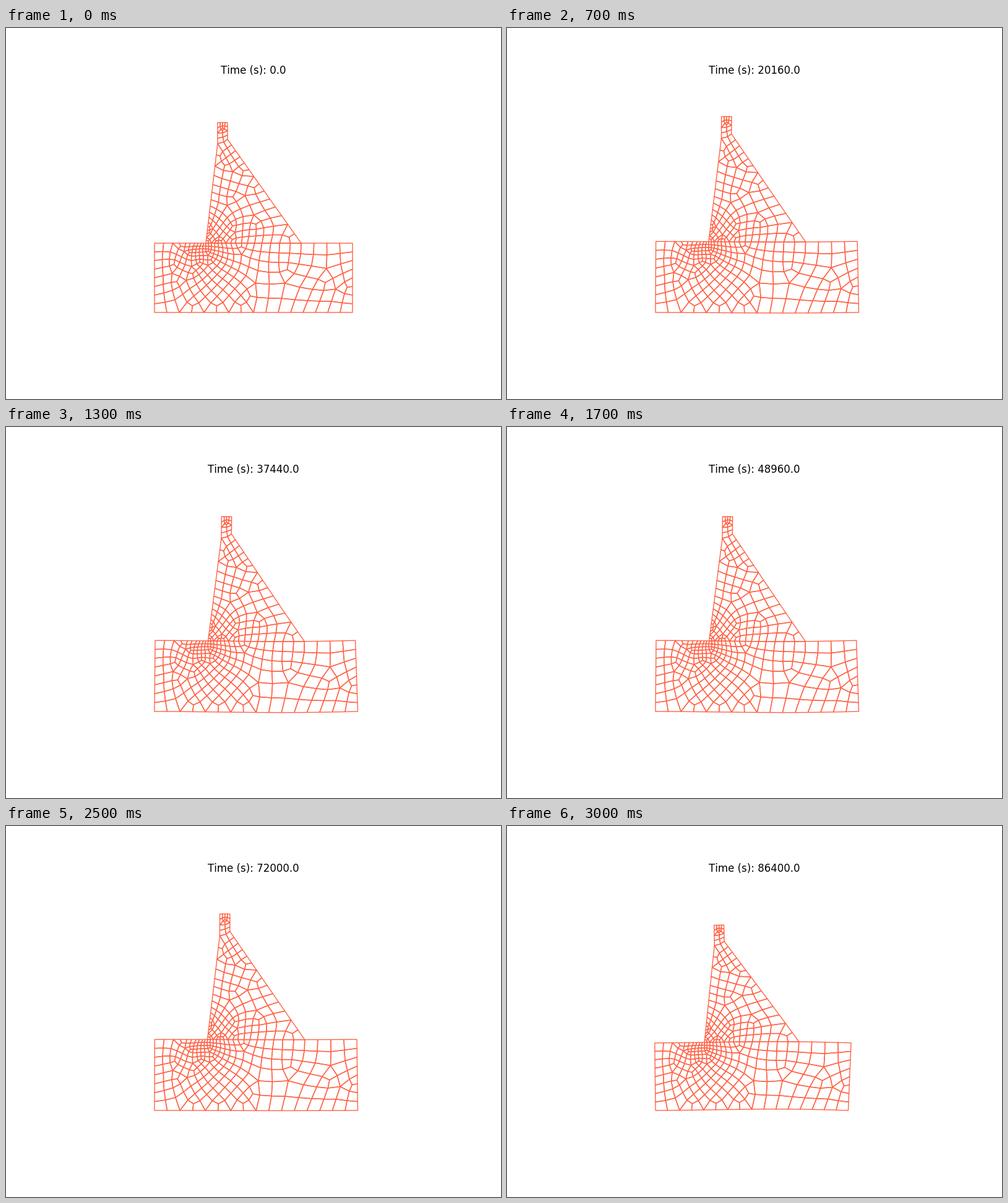
Animation, 800 px wide and 600 px high, one loop 3100 ms. Source, as a matplotlib script:

```python
import numpy as np
import matplotlib.pyplot as plt
from matplotlib.animation import FuncAnimation
from matplotlib.collections import PolyCollection
from matplotlib.path import Path
from matplotlib.tri import Triangulation

W, H, DPI = 800, 600, 100
FRAMES, INTERVAL, STEP = 31, 100, 2880.0
GROWTH = 0.26  # how fast cells grow away from fine borders

plt.rcParams["text.kerning_factor"] = 6


def side(a, b, n, ratio=1.0):
    """n + 1 points from a to b; the last gap is ratio times the first."""
    gaps = np.geomspace(1, ratio, n)
    t = np.r_[0, np.cumsum(gaps)] / gaps.sum()
    return np.outer(1 - t, a) + np.outer(t, b)


def dist(p, q):
    return np.hypot(p[:, None, 0] - q[None, :, 0], p[:, None, 1] - q[None, :, 1])


class Border:
    """Closed outline that sets the cell size inside it."""

    def __init__(self, *sides):
        self.nodes = np.concatenate([s[:-1] for s in sides])
        after = np.roll(self.nodes, -1, axis=0)
        gap = np.hypot(*(after - self.nodes).T)
        self.marks = np.r_[self.nodes, (self.nodes + after) / 2]
        self.spacing = np.r_[(gap + np.roll(gap, 1)) / 2, gap]
        self.path = Path(np.r_[self.nodes, self.nodes[:1]])

    def size(self, p):
        return (self.spacing + GROWTH * dist(p, self.marks)).min(axis=1)

    def allows(self, p):
        clear = (dist(p, self.marks) / self.spacing).min(axis=1) > 0.45
        return clear & self.path.contains_points(p)


def scatter(border, rng):
    """Random points kept apart by the local size, then pushed into even spacing."""
    low, high = border.nodes.min(axis=0), border.nodes.max(axis=0)
    trial = rng.uniform(low, high, (6000, 2))
    trial = trial[border.allows(trial)]
    pts = border.nodes
    for p, size in zip(trial, border.size(trial)):
        if np.hypot(*(pts - p).T).min() > 0.8 * size:
            pts = np.vstack([pts, p])

    inner = np.arange(len(border.nodes), len(pts))
    for _ in range(60):
        a, b = Triangulation(*pts.T).edges.T
        vec = pts[a] - pts[b]
        length = np.hypot(*vec.T)
        want = 1.1 * border.size((pts[a] + pts[b]) / 2)
        push = (0.2 * np.maximum(want / length - 1, 0))[:, None] * vec
        shift = np.zeros_like(pts)
        np.add.at(shift, a, push)
        np.add.at(shift, b, -push)
        moved = pts + shift
        ok = inner[border.allows(moved[inner])]
        pts[ok] = moved[ok]
    return pts


def skew(corners):
    """0 for a rectangle, 1 or more for a flat or folded quad."""
    ahead = np.roll(corners, -1, axis=0) - corners
    back = np.roll(corners, 1, axis=0) - corners
    cross = ahead[:, 0] * back[:, 1] - ahead[:, 1] * back[:, 0]
    if cross.min() * cross.max() <= 0:
        return 1.0
    lengths = np.hypot(*ahead.T) * np.hypot(*back.T)
    return np.abs((ahead * back).sum(axis=1) / lengths).max()


def pair_up(pts, tris):
    """Merge neighbouring triangles into quads, best shapes first."""
    owners = {}
    for t, tri in enumerate(tris):
        for k in range(3):
            owners.setdefault(frozenset((tri[k], tri[k - 1])), []).append(t)
    options = []
    for edge, pair in owners.items():
        if len(pair) == 2:
            a, b = edge
            c, d = (next(v for v in tris[t] if v not in edge) for t in pair)
            options.append((skew(pts[[a, c, b, d]]), pair, (a, c, b, d)))
    options.sort(key=lambda option: option[0])

    faces, used = [], set()
    for score, pair, quad in options:
        if score < 0.8 and used.isdisjoint(pair):
            faces.append(quad)
            used.update(pair)
    return faces + [tuple(t) for i, t in enumerate(tris) if i not in used]


def subdivide(pts, faces):
    """Cut every face into quads through its centre and edge midpoints."""
    verts, middle, quads = list(pts), {}, []

    def mid(a, b):
        key = frozenset((a, b))
        if key not in middle:
            middle[key] = len(verts)
            verts.append((pts[a] + pts[b]) / 2)
        return middle[key]

    for face in faces:
        centre = len(verts)
        verts.append(pts[list(face)].mean(axis=0))
        for k, v in enumerate(face):
            after = face[(k + 1) % len(face)]
            quads.append((v, mid(v, after), centre, mid(face[k - 1], v)))
    return np.array(verts), np.array(quads)


def smooth(verts, quads, rounds=10):
    """Draw inner nodes towards the mean of their neighbours."""
    links = np.stack([quads, np.roll(quads, -1, axis=1)], axis=-1).reshape(-1, 2)
    links, count = np.unique(np.sort(links, axis=1), axis=0, return_counts=True)
    free = np.ones(len(verts), bool)
    free[links[count == 1]] = False
    a, b = links.T
    degree = np.maximum(np.bincount(links.ravel(), minlength=len(verts)), 1)
    for _ in range(rounds):
        total = np.zeros_like(verts)
        np.add.at(total, a, verts[b])
        np.add.at(total, b, verts[a])
        mean = total / degree[:, None]
        verts[free] = (verts[free] + mean[free]) / 2
    return verts


def quad_mesh(border, seed):
    pts = scatter(border, np.random.default_rng(seed))
    tris = Triangulation(*pts.T).triangles
    p, q, r = pts[tris].transpose(1, 0, 2)
    area = np.abs((q - p)[:, 0] * (r - p)[:, 1] - (q - p)[:, 1] * (r - p)[:, 0])
    tris = tris[(area > 1) & border.path.contains_points((p + q + r) / 3)]
    verts, quads = subdivide(pts, pair_up(pts, tris.tolist()))
    return smooth(verts, quads)[quads]


# outline of the dam and of the ground below it
heel, toe = (323, 348), (477, 348)
crest_l, crest_r = (342, 153), (358, 153)
neck_l, neck_r = (342, 187), (358, 180)
top_l, top_r = (240, 348), (560, 348)
low_l, low_r = (240, 460), (560, 460)

joint = side(heel, toe, 8, 4)
dam = Border(joint, side(toe, neck_r, 7, 0.6), side(neck_r, crest_r, 2),
             side(crest_r, crest_l, 2), side(crest_l, neck_l, 2),
             side(neck_l, heel, 8, 0.25))
ground = Border(joint, side(toe, top_r, 2), side(top_r, low_r, 4),
                side(low_r, low_l, 8), side(low_l, top_l, 4),
                side(top_l, heel, 5, 0.25))
mesh = np.concatenate([quad_mesh(dam, 3), quad_mesh(ground, 8)])

# bend, lean, stretch of the dam and sag, with a cool and a warm surface
COOL = np.array([1.4e-4, 0.021, 0.032, 1.8])
WARM = np.array([0.5e-4, 0.0055, 0.042, 0.4])


def offset(share):
    """Thermal expansion from the fixed lower left corner, plus bending."""
    bend, lean, stretch, sag = COOL + share * (WARM - COOL)
    x, up = mesh[..., 0] - 240, 460 - mesh[..., 1]
    s = x / 320
    dx = 0.0266 * x - bend * (x - 65) * up + lean * up * np.sin(np.pi * s)
    rise = 0.025 * np.minimum(up, 112) + stretch * np.maximum(up - 112, 0)
    dy = sag * np.sin(np.pi * s ** 1.5) - rise
    return np.stack([dx, dy], axis=-1)


def shape(i):
    if i == 0:
        return mesh
    if 6 <= i < 28:
        return mesh + offset(((i - 15) / 10) ** 2)
    return mesh - offset(-0.008 * i)


fig = plt.figure(figsize=(W / DPI, H / DPI), dpi=DPI, facecolor="white")
ax = fig.add_axes([0, 0, 1, 1])
ax.set_xlim(0, W)
ax.set_ylim(H, 0)
ax.axis("off")
cells = PolyCollection(mesh, facecolors="none", edgecolors="tomato", linewidths=1.0)
ax.add_collection(cells, autolim=False)
title = ax.text(W / 2, 74, "", ha="center", va="baseline", fontsize=12,
                family="DejaVu Sans", color="black")


def draw(i):
    cells.set_verts(shape(i))
    title.set_text(f"Time (s): {i * STEP:.1f}")
    return cells, title


anim = FuncAnimation(fig, draw, frames=FRAMES, interval=INTERVAL,
                     repeat=True, repeat_delay=0)
plt.show()
```
